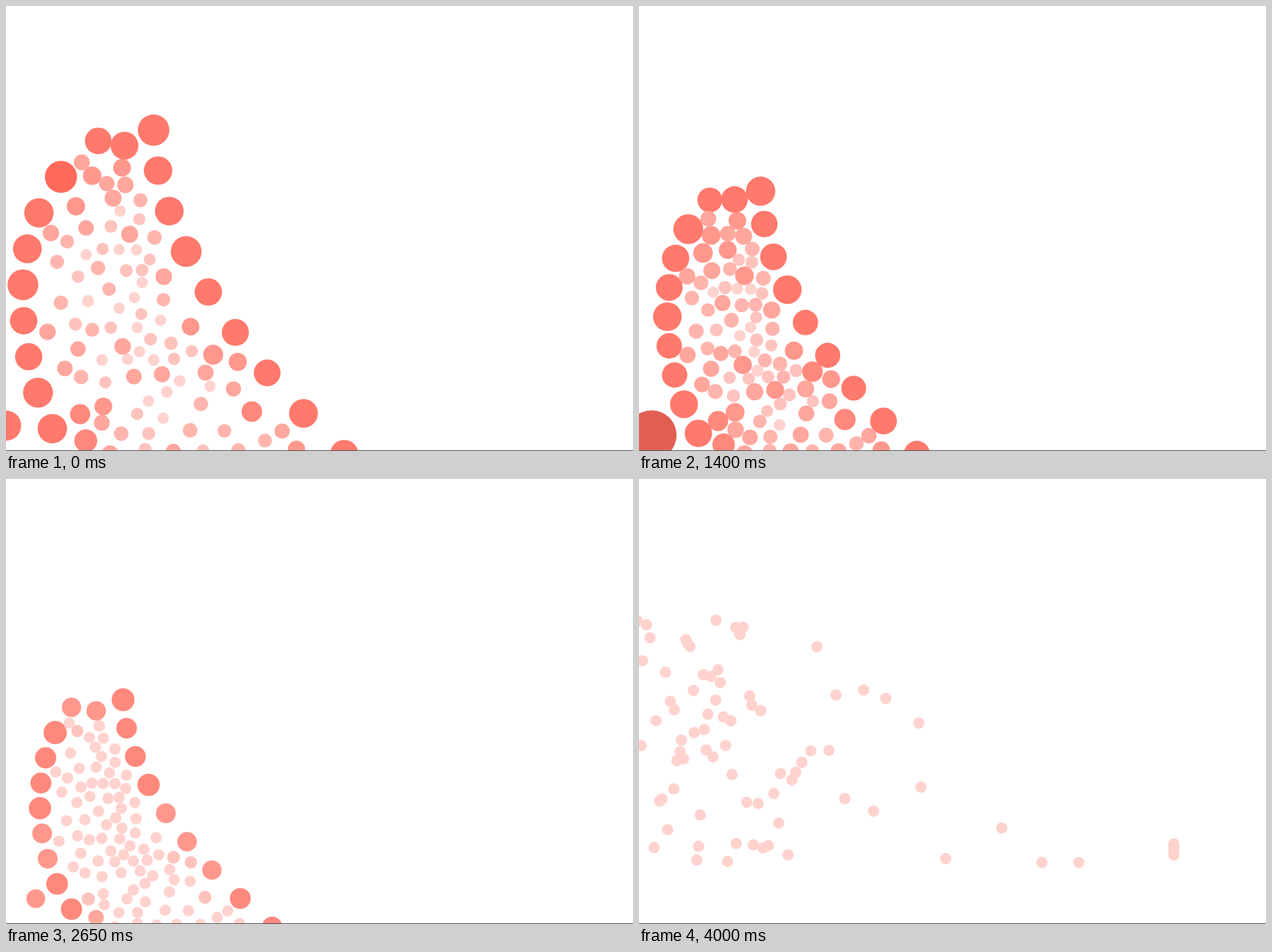
An HTML page that plays this animation: 888 by 631 pixels, repeating every 4050 ms.

```html
<!DOCTYPE html>
<html lang="en">
<head>
<meta charset="utf-8">
<title>Pulsing bubbles</title>
<style>
  html, body { margin: 0; width: 100%; height: 100%; overflow: hidden; background: #fff; }
  svg { display: block; width: 100vw; height: 100vh; }
</style>
</head>
<body>
<svg viewBox="0 0 888 631">
  <clipPath id="area"><rect y="20" width="888" height="611"/></clipPath>
  <g id="bubbles" clip-path="url(#area)"></g>
  <rect y="630" width="888" height="1" fill="#555"/>
</svg>
<script>
const LOOP = 4050, STEP = 50, BURST_START = 3300, BURST_END = 4000;
const FLOOR = 635, MIN_R = 8, SIDE_COUNT = 9, FILL_COUNT = 86;

// The heap's outline (top, left side, left and right end of the crest, flare of
// the right foot), the bubble radii at core and rim, and the large corner bubble.
const POSES = [
  { t: 0,    top: 176, left: 15, crest: 152, apex: 209, flare: 270, core: 9.5,  rim: 21,  x: 0,  y: 595, r: 21.5 },
  { t: 400,  top: 204, left: 45, crest: 134, apex: 186, flare: 230, core: 6,    rim: 13,  x: 46, y: 581, r: 26 },
  { t: 950,  top: 243, left: 43, crest: 119, apex: 177, flare: 180, core: 10.5, rim: 19,  x: 38, y: 590, r: 39 },
  { t: 1800, top: 280, left: 25, crest: 107, apex: 168, flare: 258, core: 10.5, rim: 20,  x: 0,  y: 625, r: 32 },
  { t: 2200, top: 287, left: 17, crest: 95,  apex: 172, flare: 230, core: 4,    rim: 21,  x: 28, y: 623, r: 17.5 },
  { t: 3150, top: 342, left: 70, crest: 110, apex: 159, flare: 190, core: 7,    rim: 8.8, x: 58, y: 564, r: 8.6 }
];
const PACKED = POSES[2];

let seed = 29;
const random = () => (seed = (seed * 16807) % 2147483647) / 2147483647;
const lerp = (a, b, k) => a + (b - a) * k;
const clamp01 = v => Math.min(1, Math.max(0, v));

function poseAt(t) {
  const next = POSES.findIndex(p => p.t > t);
  if (next < 0) return POSES[POSES.length - 1];
  const a = POSES[next - 1], b = POSES[next];
  const k = (t - a.t) / (b.t - a.t);
  return Object.fromEntries(Object.keys(a).map(key => [key, lerp(a[key], b[key], k)]));
}

// u runs across the heap, v from its crest to the floor.
function place(b, pose) {
  if (b.corner) return { x: pose.x, y: pose.y, r: pose.r };
  const left = pose.left + (pose.crest - pose.left) * (1 - b.v) ** 5 + 70 * b.v ** 4;
  const right = pose.apex + pose.flare * b.v ** 1.8;
  const edge = clamp01(Math.max(Math.abs(2 * b.u - 1), 1 - 2.2 * b.v));
  return {
    x: lerp(left, right, b.u),
    y: lerp(pose.top, FLOOR, b.v),
    r: Math.max(MIN_R, lerp(pose.core, pose.rim, edge ** 3) * b.scale)
  };
}

function makeBubbles() {
  const list = [{ corner: true, pinned: true }];
  for (let i = 0; i < SIDE_COUNT; i++) {
    list.push({ u: 0, v: (i + .3) / SIDE_COUNT, scale: .9 + .2 * random(), pinned: true });
    list.push({ u: 1, v: i / (SIDE_COUNT - 1), scale: .9 + .2 * random(), pinned: true });
  }
  list.forEach(b => b.home = place(b, PACKED));

  // Fill the inside, each time taking the roomiest of some random spots.
  for (let n = 0; n < FILL_COUNT; n++) {
    let best, most = -Infinity;
    for (let tries = 0; tries < 30; tries++) {
      const b = { u: lerp(.06, .94, random()), v: lerp(.05, 1, random()), scale: .75 + .5 * random() };
      b.home = place(b, PACKED);
      const room = Math.min(...list.map(o =>
        Math.hypot(o.home.x - b.home.x, o.home.y - b.home.y) / (o.home.r + b.home.r)));
      if (room > most) [best, most] = [b, room];
    }
    list.push(best);
  }

  // Bursting keeps the order from left to right, with long tails on both sides.
  [...list].sort((a, b) => a.home.x - b.home.x).forEach((b, i) => {
    const rank = Math.min(.955, (i + random()) / list.length);
    const x = 90 + 95 * Math.tan(Math.PI * (rank - .5));
    b.goal = { x, y: 545 - 360 * random() / (1 + (x / 420) ** 4) };
  });
  return list;
}

const bubbles = makeBubbles();
const layer = document.getElementById("bubbles");
for (const b of bubbles) {
  b.node = document.createElementNS("http://www.w3.org/2000/svg", "circle");
  layer.appendChild(b.node);
}

// Larger bubbles step towards full red; the very large ones darken.
function colour(r) {
  const strength = clamp01(Math.round(10.3 - 7.3 * Math.exp((MIN_R - r) / 6.5)) / 10);
  const dark = clamp01((r - 27) / 12);
  const full = [lerp(255, 211, dark), lerp(106, 90, dark), lerp(92, 77, dark)];
  return `rgb(${full.map(c => Math.round(lerp(255, c, strength)))})`;
}

function separate(spots) {
  for (let pass = 0; pass < 6; pass++) {
    for (let i = 0; i < spots.length; i++) {
      for (let j = 0; j < i; j++) {
        const a = spots[i], b = spots[j];
        if (bubbles[i].pinned && bubbles[j].pinned) continue;
        const dx = a.x - b.x, dy = a.y - b.y;
        const d = Math.hypot(dx, dy) || 1;
        const push = Math.max(0, (a.r + b.r) * .98 - d) / d;
        const share = bubbles[j].pinned ? 1 : .5;
        a.x += dx * push * share;
        a.y += dy * push * share;
        b.x -= dx * push * (1 - share);
        b.y -= dy * push * (1 - share);
      }
    }
  }
}

function draw(time) {
  const t = Math.floor((time % LOOP) / STEP) * STEP;
  const pose = poseAt(t);
  const spots = bubbles.map(b => place(b, pose));
  separate(spots);

  const burst = 1 - (1 - clamp01((t - BURST_START) / (BURST_END - BURST_START))) ** 2;
  bubbles.forEach((b, i) => {
    const r = lerp(spots[i].r, MIN_R, burst);
    b.node.setAttribute("cx", lerp(spots[i].x, b.goal.x, burst).toFixed(2));
    b.node.setAttribute("cy", lerp(spots[i].y, b.goal.y, burst).toFixed(2));
    b.node.setAttribute("r", r.toFixed(2));
    b.node.setAttribute("fill", colour(r));
  });
}

const start = performance.now();
function tick() {
  draw(performance.now() - start);
  requestAnimationFrame(tick);
}
tick();
</script>
</body>
</html>
```
